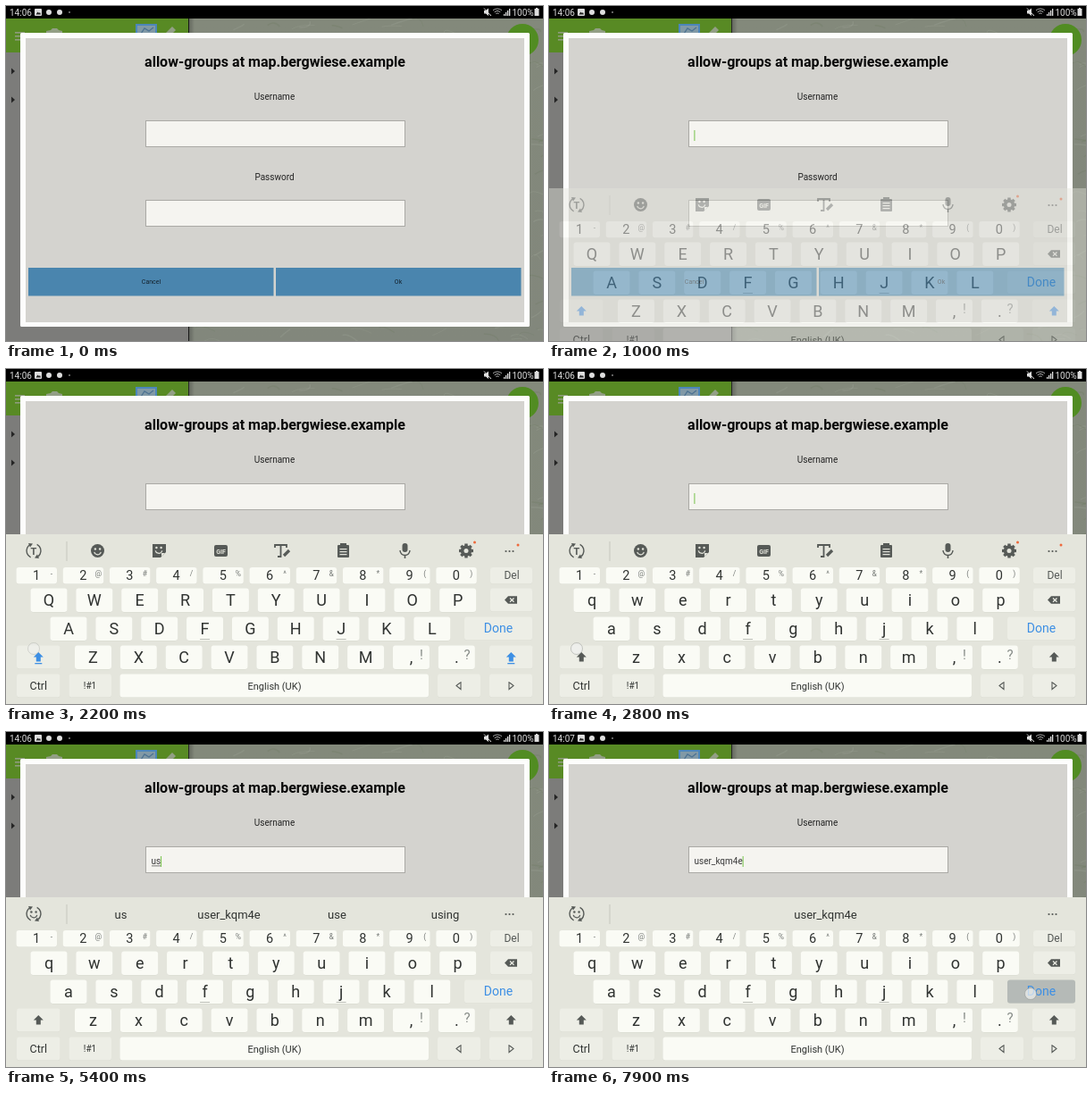
Animation, 601 px wide and 375 px high, one loop 8000 ms. Source, as an HTML page with a canvas:

```html
<!DOCTYPE html>
<html lang="en">
<head>
<meta charset="utf-8">
<title>Sign-in on a tablet</title>
<style>
  html, body { margin: 0; width: 100%; height: 100%; overflow: hidden; background: #000; }
  canvas { position: absolute; left: 0; top: 0; }
</style>
</head>
<body>
<canvas id="page" width="601" height="375"></canvas>
<canvas id="keys" width="601" height="375"></canvas>
<script>
const LOOP = 8000, STEP = 100;
const HOST = 'map.bergwiese.example', USER = 'user_kqm4e';
const INK = '#303331', ICON = '#565a57', BLUE = '#3d8fe4', RED = '#ee6a3c';
const KEY = '#fafbf5', SOFT = '#edeee6', PANEL = '#e4e5dc', HELD = '#b5bab7';

const keyLayer = document.getElementById('keys');
const pageCtx = document.getElementById('page').getContext('2d');
const keyCtx = keyLayer.getContext('2d');
let g = pageCtx;

// drawing helpers
function rect(x, y, w, h, fill) { g.fillStyle = fill; g.fillRect(x, y, w, h); }
function round(x, y, w, h, r, fill) {
  g.fillStyle = fill; g.beginPath(); g.roundRect(x, y, w, h, r); g.fill();
}
function disc(x, y, r, fill) {
  g.fillStyle = fill; g.beginPath(); g.arc(x, y, r, 0, 7); g.fill();
}
function poly(points, fill) {
  g.fillStyle = fill; g.beginPath();
  points.forEach(([x, y]) => g.lineTo(x, y));
  g.closePath(); g.fill();
}
function line(points, color, width = 1) {
  g.strokeStyle = color; g.lineWidth = width; g.beginPath();
  points.forEach(([x, y]) => g.lineTo(x, y));
  g.stroke();
}
function arc(x, y, r, from, to, color, width = 1.4) {
  g.strokeStyle = color; g.lineWidth = width;
  g.beginPath(); g.arc(x, y, r, from, to); g.stroke();
}
function label(s, x, y, size, color = INK, align = 'center', weight = 400) {
  g.font = `${weight} ${size}px Roboto, sans-serif`;
  g.textAlign = align; g.textBaseline = 'alphabetic';
  g.fillStyle = color; g.fillText(s, x, y);
}
function random(seed) {
  return () => (seed = (seed * 16807) % 2147483647) / 2147483647;
}

// timeline
const caretOn = [[700, 1100], [1600, 2100], [2600, 3100], [3500, 4000],
  [4500, 5000], [5400, 6200], [6600, 7100], [7600, LOOP]];
const touches = [
  [500, 700, 180, 139], [2100, 2400, 31, 313], [2600, 3100, 31, 313],
  [3700, 4100, 353, 259], [4700, 5000, 117, 284], [5500, 5800, 253, 204],
  [6500, 6900, 559.5, 263], [7800, 8200, 539, 293]
];
const within = (t, [from, to]) => t >= from && t < to;
function typed(t) {
  if (t < 3800) return '';
  if (t < 4800) return 'u';
  if (t < 5700) return 'us';
  return t < 6600 ? USER + ' ' : USER;
}
function suggestions(t) {
  if (t < 4100) return null;
  if (t < 5000) return ['u', USER, 'you', 'up'];
  if (t < 5700) return ['us', USER, 'use', 'using'];
  return t < 6600 ? ['is', 'the', 'in', 'and'] : [USER];
}

// page behind the keyboard
function drawMap() {
  const fade = g.createLinearGradient(0, 14, 0, 375);
  fade.addColorStop(0, '#83897b'); fade.addColorStop(1, '#82877c');
  rect(205, 14, 396, 361, fade);
  const rnd = random(77);
  for (let i = 0; i < 46; i++) {
    const right = i % 2;
    const x = right ? 583 + rnd() * 18 : 210 + rnd() * 380;
    const y = right ? 60 + rnd() * 310 : i % 4 ? 14 + rnd() * 16 : 360 + rnd() * 15;
    g.strokeStyle = i % 3 ? 'rgba(160,167,152,.3)' : 'rgba(108,122,96,.3)';
    g.lineWidth = .6 + rnd();
    g.beginPath(); g.moveTo(x, y);
    g.quadraticCurveTo(x + rnd() * 16, y - 8 + rnd() * 8, x + 10 + rnd() * 16, y - 9 + rnd() * 18);
    g.stroke();
  }
}
function drawApp() {
  drawMap();
  const shade = g.createLinearGradient(204, 0, 211, 0);
  shade.addColorStop(0, 'rgba(40,40,40,.4)'); shade.addColorStop(1, 'rgba(40,40,40,0)');
  rect(204, 14, 7, 361, shade);
  rect(0, 14, 204, 361, '#7c7c7a');
  rect(0, 14, 204, 38, '#588a24');
  for (const y of [29, 33, 37]) rect(10, y, 11, 1.6, '#8d9c7c');
  poly([[45, 31], [45, 28], [50, 27], [52, 25], [57, 25], [59, 27], [63, 28], [63, 31]], '#939f86');
  rect(145, 20, 24, 12, '#4c86ba');
  rect(147, 22, 20, 10, '#8199a6');
  line([[151, 31], [155, 25], [160, 28], [165, 24]], '#4c7292', 1.3);
  poly([[178, 31], [186, 23], [190, 27], [186, 31]], '#939f86');
  for (const y of [73, 105]) poly([[6, y - 3.5], [10, y], [6, y + 3.5]], '#252525');
  disc(578, 38, 18, '#518c22');
}
function drawStatus(t) {
  const pale = '#dedede';
  rect(0, 0, 601, 14, '#000');
  label(t < 7800 ? '14:06' : '14:07', 4, 10.5, 10, pale, 'left');
  round(32, 3, 8, 8, 1, pale);
  poly([[33.5, 9.5], [35.5, 6.5], [37, 8], [38, 7], [39, 9.5]], '#222');
  disc(48, 7, 3, pale);
  disc(60, 7, 3, pale);
  disc(71, 7, .8, pale);
  poly([[535, 5], [537, 5], [540, 2.5], [540, 11], [537, 8.5], [535, 8.5]], pale);
  line([[535, 2.5], [543, 11]], pale);
  for (const r of [2.5, 5, 7.5]) arc(550, 10.5, r, -2.3, -.85, '#aaa', 1);
  for (let i = 0; i < 4; i++) rect(557 + i * 2, 9 - i * 2, 1.3, 2 + i * 2, pale);
  label('100%', 566.5, 10.5, 10, pale, 'left');
  rect(591.5, 3, 5, 8, pale);
  rect(593, 2, 2, 1, pale);
}
function drawField(y) {
  rect(156, y, 291, 30, '#aaa9a5');
  rect(157, y + 1, 289, 28, '#f5f4f0');
}
function drawDialog(t) {
  round(16, 30, 570, 329, 1.5, '#fdfdfc');
  rect(22, 36, 558, 318, '#d4d3cf');
  label('allow-groups at ' + HOST, 301, 68, 16, '#080808', 'center', 700);
  label('Username', 300.5, 105, 10, '#222');
  label('Password', 300.5, 195, 10, '#222');
  drawField(128);
  drawField(217);
  [[25, 'Cancel', 162.5], [302, 'Ok', 439]].forEach(([x, name, mid]) => {
    rect(x, 293, 274.5, 31.5, '#4a85ae');
    label(name, mid, 311, 7, '#14222c');
  });
  const text = typed(t);
  label(text, 162.5, 148, 10, '#3a3a3a', 'left');
  const width = g.measureText(text).width;
  if (text && t < 5700) rect(163, 149.5, width - .5, .8, '#555');
  if (caretOn.some(span => within(t, span))) {
    rect(162.4 + width, 139, 1, 12, '#78c44c');
  }
}

// keyboard
function swirl() {
  arc(31, 203.5, 8, 2.0, 4.1, ICON);
  arc(31, 203.5, 8, -1.1, 1.0, ICON);
  poly([[25, 195], [30, 195.5], [27, 199.5]], ICON);
  poly([[37, 212], [32, 211.5], [35, 207.5]], ICON);
}
function smile(x, y, color) {
  disc(x - 2.6, y - 2, 1.2, color);
  disc(x + 2.6, y - 2, 1.2, color);
  arc(x, y + .5, 3.8, .2, 2.94, color, 1.3);
}
function drawTools() {
  swirl();
  label('T', 31, 208, 11, ICON, 'center', 700);
  disc(102.5, 203.5, 7.5, ICON);
  smile(102.5, 203.5, PANEL);
  poly([[164, 196], [179, 196], [179, 205], [173, 211], [164, 211]], ICON);
  poly([[174, 210], [174, 206], [178, 206]], PANEL);
  smile(171, 202, PANEL);
  round(233, 197, 15, 13, 2, ICON);
  label('GIF', 240.5, 206.5, 7, PANEL, 'center', 700);
  line([[301, 200], [301, 197], [314, 197], [314, 200]], ICON, 1.8);
  line([[307.5, 197], [307.5, 210], [304, 210]], ICON, 1.8);
  line([[311, 209], [317, 203]], ICON, 3.2);
  round(371, 197, 13, 14, 1, ICON);
  rect(374, 195, 7, 4, ICON);
  for (const y of [201, 204, 207]) rect(373.5, y, 8, 1.2, PANEL);
  round(443.5, 195, 6, 10, 3, ICON);
  arc(446.5, 203, 5.5, 0, Math.PI, ICON);
  rect(445.7, 208, 1.6, 4, ICON);
  for (let i = 0; i < 8; i++) {
    const a = i * Math.PI / 4, c = Math.cos(a), s = Math.sin(a);
    line([[515 + c * 4, 203.5 + s * 4], [515 + c * 8, 203.5 + s * 8]], ICON, 3.4);
  }
  disc(515, 203.5, 6.2, ICON);
  disc(515, 203.5, 2.5, PANEL);
  disc(524.5, 194, 1.5, RED);
  disc(573, 197, 1.5, RED);
}
function drawStrip(t) {
  const words = suggestions(t);
  if (words) {
    swirl();
    smile(31, 203.5, ICON);
    words.forEach((word, i) =>
      label(word, words.length > 1 ? 128.5 + i * 121 : 309.5, 208.5, 13));
  } else drawTools();
  rect(67.5, 193, 1, 22, '#c5c7be');
  for (const x of [559.5, 563.5, 567.5]) disc(x, 204, 1.1, ICON);
}
function key(x, y, w, h, fill) {
  round(x, y + .6, w, h, 3, '#d8d9d0');
  round(x, y, w, h, 3, fill);
}
function letterRow(letters, mid, y, upper) {
  [...letters].forEach((c, i) => {
    const x = mid + i * 50.85;
    key(x - 20.5, y, 41, 26.5, KEY);
    label(upper ? c.toUpperCase() : c, x, y + 19.5, 18);
    if (c === 'f' || c === 'j') rect(x - 5.5, y + 24.5, 11, 1, '#bdbfb8');
  });
}
function drawShift(x, t) {
  const held = within(t, [2100, 2200]) || within(t, [2600, 2700]);
  const color = t < 2700 ? BLUE : ICON;
  key(x, 309.5, 48.5, 26, held ? HELD : SOFT);
  const m = x + 24.3;
  poly([[m, 317], [m + 5.5, 322.5], [m + 2.5, 322.5], [m + 2.5, 327.5],
    [m - 2.5, 327.5], [m - 2.5, 322.5], [m - 5.5, 322.5]], color);
  if (within(t, [2200, 2700])) rect(m - 4, 329, 8, 1.3, BLUE);
}
function drawKeyboard(t) {
  const upper = t < 2700;
  rect(0, 185, 601, 190, PANEL);
  drawStrip(t);
  [...'1234567890'].forEach((c, i) => {
    const x = 11.5 + i * 52.2;
    key(x, 222, 45.5, 18.5, KEY);
    label(c, x + 22.5, 236, 14.5);
    label('-@#/%^&*()'[i], x + 39.5, 232, 8.5, '#777b78');
  });
  key(542, 222, 47, 18.5, SOFT);
  label('Del', 566, 235, 12, ICON);

  letterRow('qwertyuiop', 48, 245.5, upper);
  key(542, 245.5, 47, 26, within(t, [6500, 6700]) ? HELD : SOFT);
  poly([[558, 258.5], [562, 254.3], [572, 254.3], [572, 262.7], [562, 262.7]], ICON);
  line([[564, 256.5], [568.5, 260.7]], SOFT, 1.2);
  line([[568.5, 256.5], [564, 260.7]], SOFT, 1.2);

  letterRow('asdfghjkl', 70, 277.5, upper);
  key(513, 277.5, 76, 26, t >= 7800 ? HELD : SOFT);
  label('Done', 551, 295, 14, BLUE);

  drawShift(12, t);
  letterRow('zxcvbnm,.', 97.5, 309.5, upper);
  label('!', 465, 325, 15, '#858a86');
  label('?', 516, 325, 15, '#858a86');
  drawShift(541, t);

  key(12, 341.5, 48.5, 26, SOFT);
  label('Ctrl', 36.3, 358.5, 12.5);
  key(70.5, 341.5, 47.5, 26, SOFT);
  label('!#1', 94, 358, 10);
  key(127.5, 341.5, 345.5, 26, KEY);
  label('English (UK)', 300.5, 358.5, 11);
  [[483, -1], [541, 1]].forEach(([x, dir]) => {
    key(x, 341.5, 48, 26, SOFT);
    const m = x + 24;
    line([[m - 2 * dir, 350.5], [m + 3 * dir, 354.5], [m - 2 * dir, 358.5],
      [m - 2 * dir, 350]], ICON, 1.1);
  });
}

function drawTouch(t) {
  touches.filter(span => within(t, span)).forEach(([, end, x, y]) => {
    g.globalAlpha = Math.min(1, (end - t) / 300);
    disc(x, y, 6.5, 'rgba(238,240,238,.72)');
    arc(x, y, 6.5, 0, 7, 'rgba(130,134,130,.5)', .8);
    g.globalAlpha = 1;
  });
}

function render(now) {
  const t = Math.floor((now % LOOP) / STEP) * STEP;
  g = pageCtx;
  drawApp();
  drawStatus(t);
  drawDialog(t);
  if (t < 900) drawTouch(t);

  // the keyboard slides up while it fades in
  const rise = Math.max(0, Math.min(1, (t - 880) / 220));
  keyLayer.style.opacity = t < 900 ? 0 : rise ** 1.4;
  keyLayer.style.transform = `translateY(${Math.round(42 * (1 - rise))}px)`;
  g = keyCtx;
  g.clearRect(0, 0, 601, 375);
  drawKeyboard(t);
  if (t >= 900) drawTouch(t);
}

const start = performance.now();
function tick() {
  render(performance.now() - start);
  requestAnimationFrame(tick);
}
tick();
</script>
</body>
</html>
```
